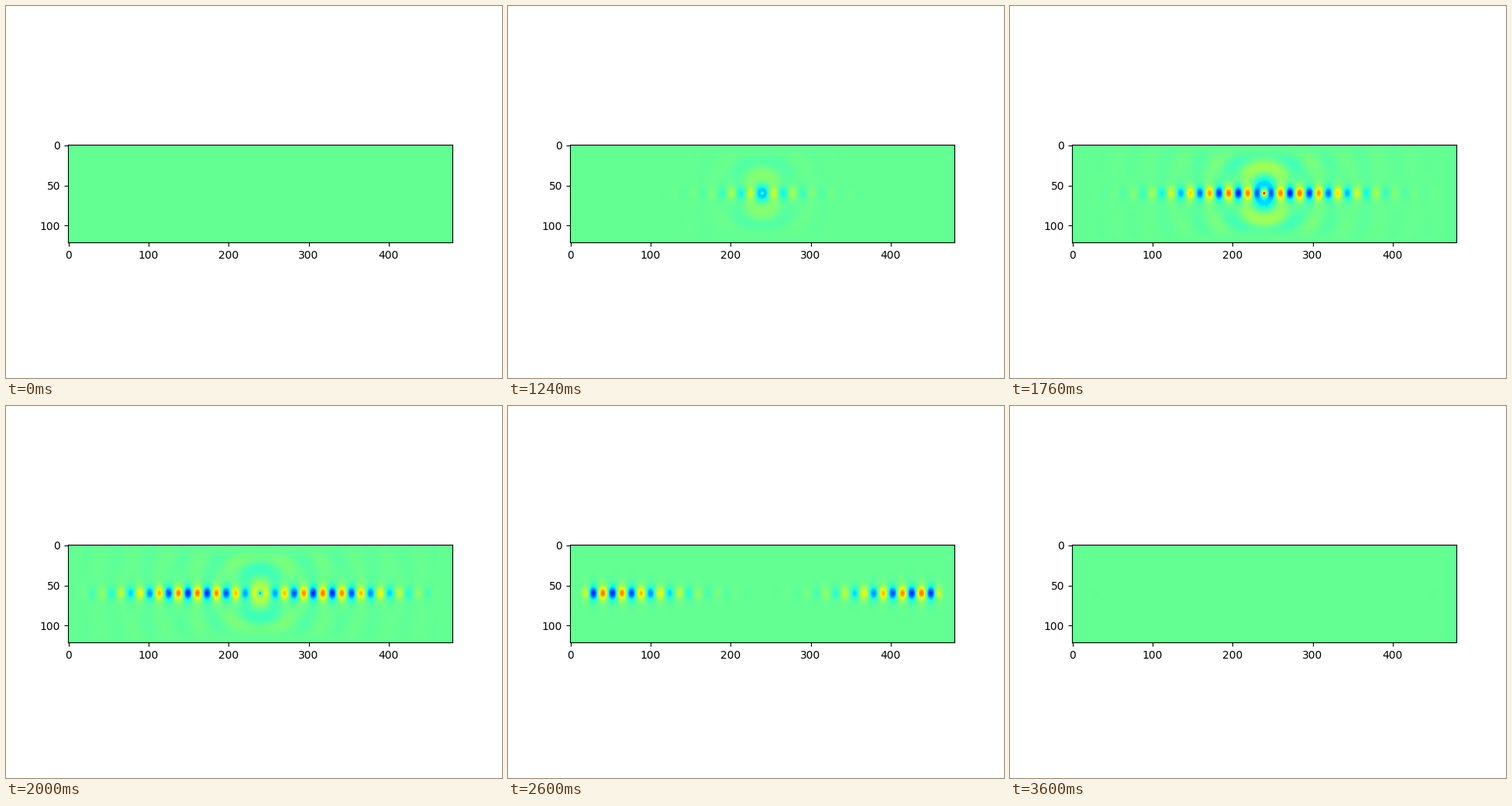
These frames come from a looping animation (640 px wide and 480 px high, 6640 ms). A matplotlib script:

```python
import numpy as np
import matplotlib.pyplot as plt
from matplotlib.animation import FuncAnimation

# A pulsed point source in the middle of a dielectric slab (2D wave equation,
# staggered grid, absorbing layers on all sides).
NX, NY = 480, 122            # cells shown
FRAMES, FRAME_MS = 166, 40
FIRST, LAST = 22, 90         # the field is visible and moving between these
STEPS = 24                   # time steps per frame
DT = 0.669                   # in cell widths
LAYER = 30                   # absorbing layer, in cells
EPS_CORE, HALF_WIDTH = 4.0, 5

PULSE_PEAK, PULSE_WIDTH = 39.7, 8.0      # in frames
CYCLES_PER_FRAME = 0.4025


def source(t):
    """Gaussian pulse on a carrier; t in frames."""
    envelope = np.exp(-((t - PULSE_PEAK) / PULSE_WIDTH) ** 2 / 2)
    return envelope * np.cos(2 * np.pi * (CYCLES_PER_FRAME * (t - 38) + 0.4374))


def damping(pos, size):
    """Decay and gain factors of one update at the given positions."""
    depth = np.maximum(LAYER - np.minimum(pos, size - pos), 0) / LAYER
    loss = 25.9 / LAYER * depth ** 2 * DT / 2
    return (1 - loss) / (1 + loss), DT / (1 + loss)


def simulate():
    row, col = NY // 2, NX // 2
    dist = np.abs(np.arange(NY + 1) - row)
    eps = np.where(dist < HALF_WIDTH, EPS_CORE, 1.0)
    eps[dist == HALF_WIDTH] = (EPS_CORE + 1) / 2
    eps = eps[:, None]

    keep_ex, gain_ex = damping(np.arange(1, NX), NX)
    keep_hx, gain_hx = damping(np.arange(NX) + 0.5, NX)
    keep_ey, gain_ey = (a[:, None] for a in damping(np.arange(1, NY), NY))
    keep_hy, gain_hy = (a[:, None] for a in damping(np.arange(NY) + 0.5, NY))
    gain_ex = gain_ex / eps
    gain_ey = gain_ey / eps[1:-1]

    field = np.zeros((NY + 1, NX + 1))
    part_x, part_y = np.zeros_like(field), np.zeros_like(field)
    flux_x = np.zeros((NY + 1, NX))
    flux_y = np.zeros((NY, NX + 1))
    shots = np.zeros((LAST + 1, NY, NX))

    for step in range(1, LAST * STEPS + 1):
        flux_x *= keep_hx
        flux_x += gain_hx * (field[:, 1:] - field[:, :-1])
        flux_y *= keep_hy
        flux_y += gain_hy * (field[1:] - field[:-1])

        part_x[:, 1:-1] *= keep_ex
        part_x[:, 1:-1] += gain_ex * (flux_x[:, 1:] - flux_x[:, :-1])
        part_y[1:-1] *= keep_ey
        part_y[1:-1] += gain_ey * (flux_y[1:] - flux_y[:-1])
        part_x[row, col] += DT / EPS_CORE * source((step - 0.5) / STEPS)
        np.add(part_x, part_y, out=field)
        field[[0, -1]] = 0
        field[:, [0, -1]] = 0

        frame, rest = divmod(step, STEPS)
        if rest == 0 and frame >= FIRST:
            # cell value: mean of its four corners
            shots[frame] = (field[1:, 1:] + field[1:, :-1]
                            + field[:-1, 1:] + field[:-1, :-1]) / 4
    return shots


shots = simulate()
low = shots.min()

fig, ax = plt.subplots(figsize=(6.4, 4.8), dpi=100)
image = ax.imshow(shots[0], cmap="jet", vmin=low, vmax=-1.125 * low)


def init():
    image.set_data(shots[0])
    return [image]


def update(frame):
    image.set_data(shots[min(frame, LAST)])
    return [image]


anim = FuncAnimation(fig, update, frames=FRAMES, init_func=init,
                     interval=FRAME_MS, repeat=True, repeat_delay=0)
plt.show()
```
